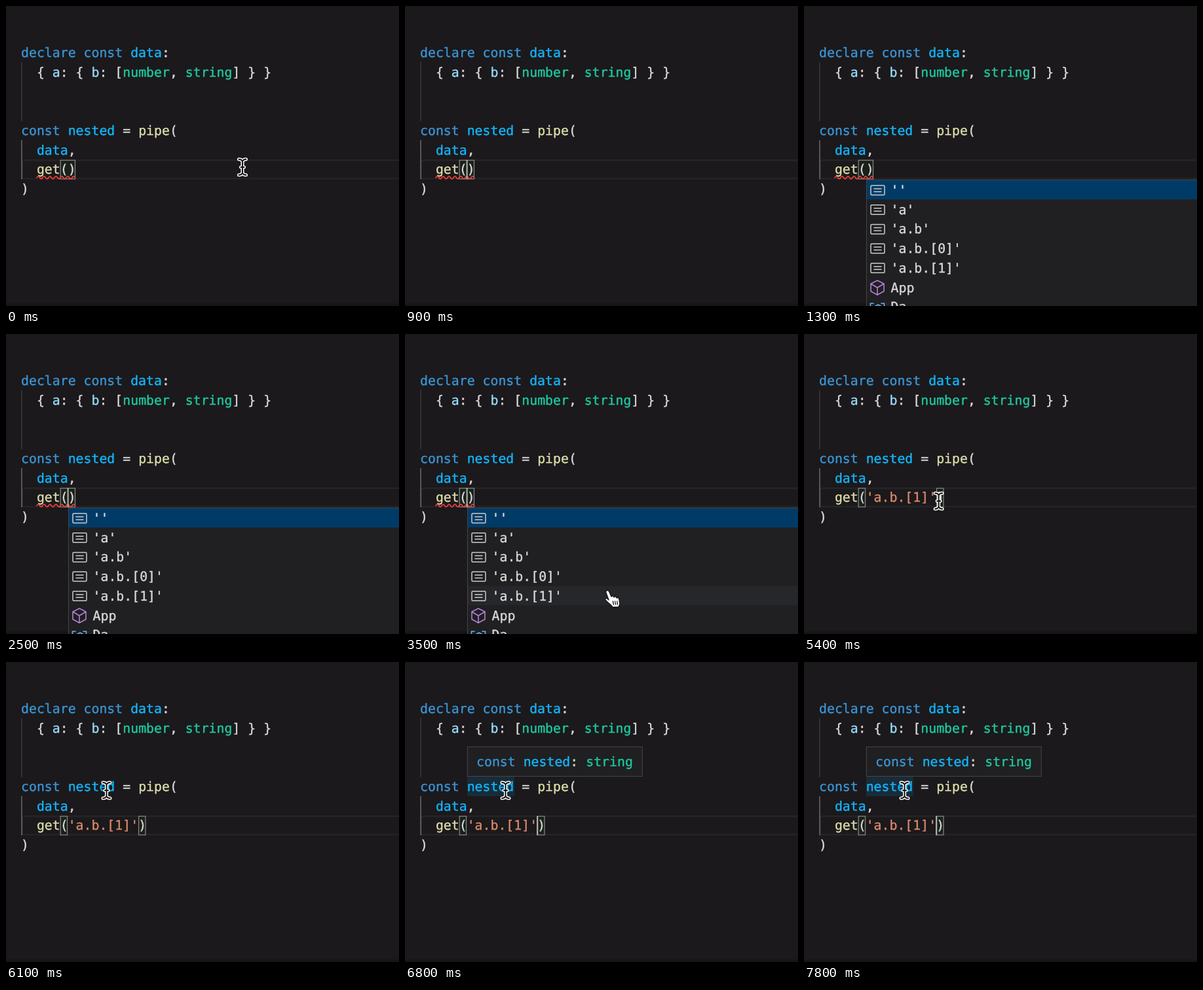
Animation, 600 px wide and 458 px high, one loop 8 s. Source, as an HTML page:

```html
<!DOCTYPE html>
<html lang="en">
<head>
<meta charset="utf-8">
<title>Typed path completion</title>
<style>
  html, body { margin: 0; height: 100%; overflow: hidden; background: #1b191b; }
  svg { display: block; width: 100vw; height: 100vh; }
  text {
    font: 19.84px "DejaVu Sans Mono", monospace;
    color: #d8d8d8; white-space: pre; text-rendering: geometricPrecision;
  }
  text, tspan { fill: currentColor; stroke: currentColor; stroke-width: .4px; }
  path, .outline { fill: none; stroke-linecap: round; stroke-linejoin: round; }
  .keyword { color: #3a94d5; }
  .variable { color: #12b5fb; }
  .property { color: #94dcfe; }
  .type { color: #1cc9a0; }
  .call { color: #dcdcaa; }
  .string { color: #d9886a; }
  .panel { fill: #201f21; stroke: #454547; }
</style>
</head>
<body>
<svg viewBox="0 0 600 458" preserveAspectRatio="none">
  <rect width="600" height="458" fill="#1b191b"/>
  <rect y="454" width="600" height="4" fill="#161416"/>
  <rect class="outline" x="25" y="235.500" width="590" height="28" stroke="#272628" stroke-width="2"/>
  <path d="M24 86V175" stroke="#3c3b3c" stroke-width="1.5" stroke-linecap="butt"/>
  <path d="M24 205.500V264" stroke="#6c6b6c" stroke-width="1.5"/>
  <rect id="wordMark" x="95" y="175" width="72" height="30" fill="#182c39"/>
  <g id="brackets" fill="#1a211a" stroke="#828282" stroke-width="1.3"></g>
  <g id="code"></g>
  <path id="squiggle" stroke="#f23d3d" stroke-width="1.7"/>
  <rect id="caret" y="235" width="2" height="29.500" fill="#b4b4b0"/>

  <g id="loading">
    <rect class="panel" x="95.500" y="265.500" width="357" height="32"/>
    <text x="131" y="288">Loading...</text>
  </g>

  <g id="menu">
    <rect class="panel" x="95.500" y="265.500" width="520" height="210"/>
    <rect x="96" y="266" width="504" height="29.300" fill="#003b68"/>
    <rect id="hoverRow" x="96" width="504" height="29.700" fill="#25272a"/>
    <g id="items"></g>
    <path d="M112 419L122 424V435.500L112 441L102 435.500V424ZM102 424L112 430L122 424M112 430V441"
      stroke="#b180d7" stroke-width="1.6"/>
    <path d="M106 454H101.500V468M118 454H122.500V468M106 460L113 456L119 459" stroke="#62b6f8" stroke-width="1.6"/>
  </g>

  <g id="tooltip">
    <rect class="panel" x="95.300" y="129.500" width="267" height="45"/>
    <text x="109" y="159"><tspan class="keyword">const</tspan> <tspan class="variable">nested</tspan>: <tspan class="type">string</tspan></text>
  </g>

  <g id="beam">
    <path id="beamShape" d="M-5.500 -12Q-1 -12 0 -8.500Q1 -12 5.500 -12M0 -8.500V8.500M-5.500 12Q-1 12 0 8.500Q1 12 5.500 12M-2.500 0H2.500"
      stroke="#fff" stroke-width="5"/>
    <path id="beamCore" stroke="#111" stroke-width="2"/>
  </g>
  <g id="hand" stroke="#111" stroke-width="1.3">
    <path style="fill:#fff" d="M-4 3C-5 -1 -1 -2 1 2L4 9C5 7 8 8 8 10C9 8 12 9 12 11C14 10 16 11 16 14L17 20L15 25H6C4 21 -2 18 -5 14C-6 11 -3 11 -1 13L0 14Z"/>
    <path d="M6.500 16L7.500 21M9.700 16L10.500 21M12.900 16L13.300 21"/>
  </g>
</svg>
<script>
const LOOP = 8000, ROW = 29.7, LEFT = 23, ADVANCE = 11.94;
const LITERAL = "'a.b.[1]'";
const TIMES = { mouseHidden: 800, loading: 1000, menu: 1300, mouseBack: 2600,
                accepted: 4300, colored: 4600, checked: 5200, tooltip: 6300 };
const MOUSE = [[0, 361, 246], [2600, 361, 246], [3200, 316, 416], [3500, 311, 392],
               [4300, 311, 392], [4500, 311.700, 390.200], [4900, 311.700, 390.200],
               [5700, 157, 193], [6100, 153.500, 196]];

const $ = id => document.getElementById(id);
const span = (kind, text) => `<tspan class="${kind}">${text}</tspan>`;
const show = (id, on) => $(id).style.display = on ? '' : 'none';
const column = n => LEFT + n * ADVANCE;

const lines = {
  0: `${span('keyword', 'declare const')} ${span('variable', 'data')}:`,
  1: `  { ${span('property', 'a')}: { ${span('property', 'b')}: [${span('type', 'number')}, ${span('type', 'string')}] } }`,
  4: `${span('keyword', 'const')} ${span('variable', 'nested')} = ${span('call', 'pipe')}(`,
  5: `  ${span('variable', 'data')},`,
  6: `  ${span('call', 'get')}(<tspan id="literal"></tspan>)`,
  7: ')'
};
$('code').innerHTML = Object.entries(lines).map(([row, content]) =>
  `<text x="${LEFT}" y="${78 + row * ROW}">${content}</text>`).join('');

$('items').innerHTML = ["''", "'a'", "'a.b'", "'a.b.[0]'", LITERAL, 'App', 'Da'].map((label, i) => {
  const icon = i > 4 ? '' : `<g transform="translate(0 ${i * ROW})" stroke="#ccc" stroke-width="1.5">
    <rect class="outline" x="102" y="274" width="21" height="14.500" rx="1.500"/>
    <path d="M107 279H118M107 283.500H118"/></g>`;
  return `${icon}<text x="132.500" y="${288 + i * ROW}">${label}</text>`;
}).join('');

$('beamCore').setAttribute('d', $('beamShape').getAttribute('d'));

function mouseAt(t) {
  const next = MOUSE.findIndex(key => key[0] > t);
  if (next < 0) return MOUSE.at(-1).slice(1);
  const [t0, x0, y0] = MOUSE[next - 1], [t1, x1, y1] = MOUSE[next];
  const u = (t - t0) / (t1 - t0), ease = u * u * (3 - 2 * u);
  return [x0 + (x1 - x0) * ease, y0 + (y1 - y0) * ease];
}

let filled;
function setLiteral(accepted) {
  if (filled === accepted) return;
  filled = accepted;
  const box = (from, count) =>
    `<rect x="${column(from) + .5}" y="235.500" width="${count * ADVANCE - 1.6}" height="28.500"/>`;
  $('literal').textContent = accepted ? LITERAL : '';
  $('brackets').innerHTML = accepted ? box(5, 1) + box(15, 1) : box(5, 2);
  $('caret').setAttribute('x', column(accepted ? 15 : 6) - 1);
  const halfWaves = accepted ? 37 : 13;
  $('squiggle').setAttribute('d', 'M47 262q2.25 -3.800 4.5 0' + 't4.5 0'.repeat(halfWaves - 1));
}

function draw(t) {
  const accepted = t >= TIMES.accepted;
  const menuOpen = t >= TIMES.menu && !accepted;
  setLiteral(accepted);
  $('literal').setAttribute('class', t >= TIMES.colored ? 'string' : '');
  show('squiggle', t < TIMES.checked);
  show('caret', Math.floor(t / 500) % 2);
  show('loading', t >= TIMES.loading && t < TIMES.menu);
  show('menu', menuOpen);

  const [x, y] = mouseAt(t);
  const mouseVisible = t < TIMES.mouseHidden || t >= TIMES.mouseBack;
  const overMenu = menuOpen && mouseVisible && y > 266;
  const row = Math.floor((y - 266) / ROW);
  show('hoverRow', overMenu && row > 0);
  $('hoverRow').setAttribute('y', 266 + row * ROW);
  show('hand', overMenu);
  show('beam', mouseVisible && !overMenu);
  for (const id of ['hand', 'beam']) $(id).setAttribute('transform', `translate(${x} ${y})`);

  const fade = Math.min(1, Math.max(0, (t - TIMES.tooltip + 50) / 150));
  $('tooltip').style.opacity = $('wordMark').style.opacity = fade;
}

const start = performance.now();
function tick() {
  draw((performance.now() - start) % LOOP);
  requestAnimationFrame(tick);
}
tick();
</script>
</body>
</html>
```
